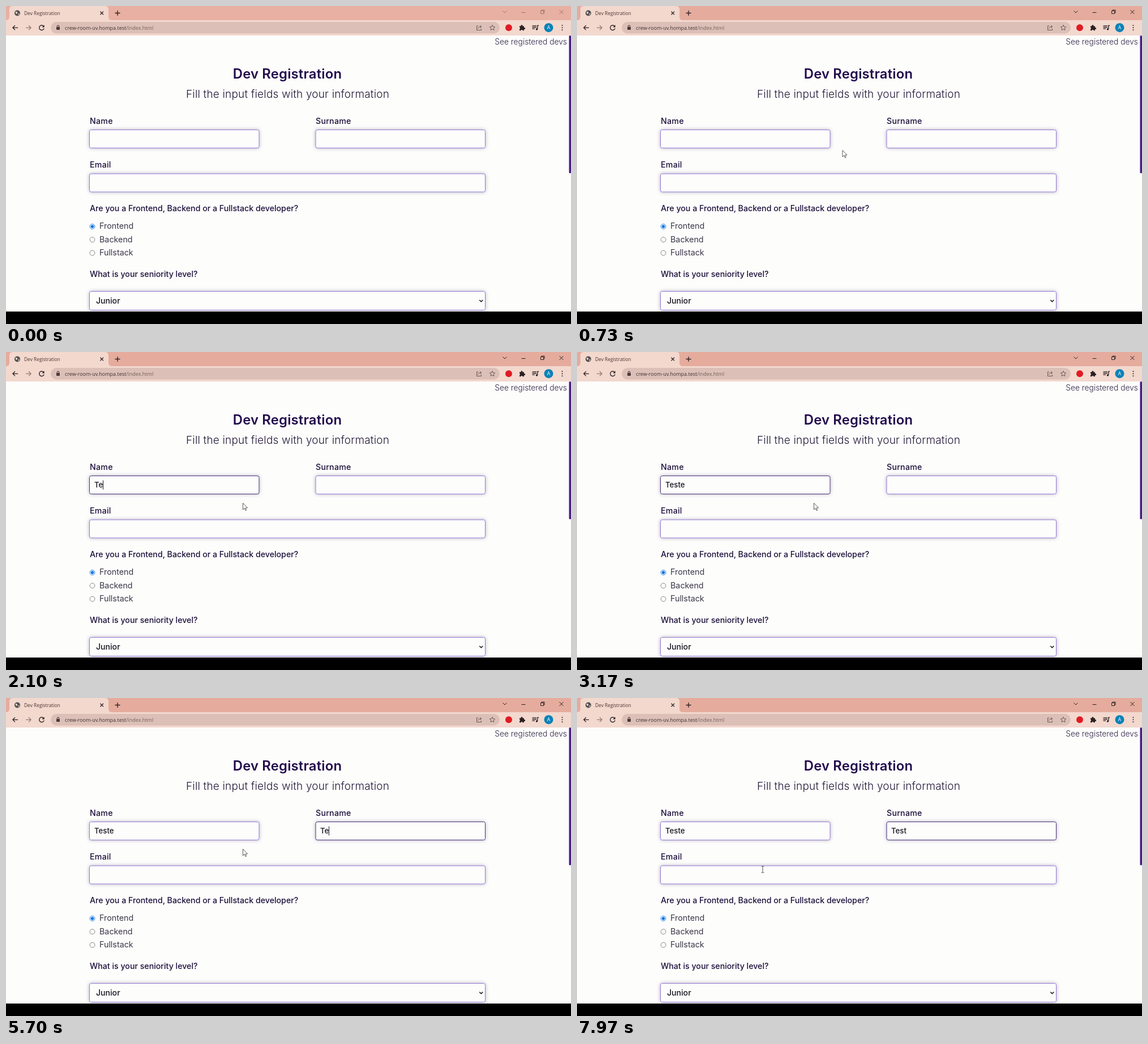
An HTML page for the animation above (8 s loop, 998x561 px).

```html
<!DOCTYPE html>
<html lang="en">
<head>
<meta charset="utf-8">
<title>Dev Registration</title>
<style>
html, body { margin: 0; width: 100%; height: 100%; overflow: hidden; background: #000; }
svg { display: block; width: 998px; height: 561px; }
text { font-family: Inter, "Open Sans", sans-serif; white-space: pre; }
.chrome text { font-family: "Open Sans", "Noto Sans", sans-serif; }
.line { fill: none; stroke: #2b2022; stroke-width: 1.3; }
.thin { stroke-width: 1; }
.label { font-size: 14.2px; font-weight: 450; fill: #1c0f3a; }
.choice { font-size: 14.3px; fill: #3b3547; }
.value { font-size: 13.2px; font-weight: 450; fill: #17121f; }
.box { fill: #fdfdfc; stroke: #967ad8; stroke-width: 1; filter: drop-shadow(0 0 3px rgba(85, 70, 110, .42)); }
.radio { fill: #fff; stroke: #767676; stroke-width: .9; }
.caret { fill: #17121f; }
</style>
</head>
<body>
<svg viewBox="0 0 998 561">
  <rect width="998" height="540" fill="#fdfdfc"/>

  <g class="chrome">
    <rect id="strip" width="998" height="26" fill="#e5ac9d"/>
    <path d="M0 25Q6 25 6 19V6Q6 0 12 0H175Q181 0 181 6V19Q181 25 187 25H998V52H0Z" fill="#f3d8ce"/>
    <circle cx="20" cy="12.5" r="5" fill="#55504f"/>
    <path d="M16.5 11Q19 9 20 11T18 14ZM21 14L24 12.5 22.5 16Z" fill="#f3d8ce"/>
    <text x="32" y="15.5" font-size="8.4" fill="#4a3633">Dev Registration</text>
    <path class="line" d="M166.5 9.7L172 15.2M172 9.7L166.5 15.2M192.5 12.5H201.5M197 8V17"/>

    <g id="win" class="line thin">
      <path d="M877.5 8.5L881 12 884.5 8.5M910.5 11.5H917.5"/>
      <path d="M944.5 8.5H949.5V13.5H944.5ZM946 8.5V7H951V12H949.5"/>
      <path d="M977.5 7L984.5 14M984.5 7L977.5 14"/>
    </g>

    <path class="line" d="M21 38.3H12M16 34.2L11.9 38.3 16 42.4"/>
    <path class="line" d="M35 38.3H44M40 34.2L44.1 38.3 40 42.4" opacity=".5"/>
    <path class="line" d="M66.3 35.5A4.3 4.3 0 1 0 67.2 39.3"/>
    <path d="M67.6 33.3V37.4H63.5Z" fill="#2b2022"/>
    <rect x="79" y="28" width="793" height="20.5" rx="10.2" fill="#dcc0b7"/>
    <rect x="89" y="37" width="6" height="5" rx=".7" fill="#4b393a"/>
    <path class="line thin" d="M90.3 37.5V35.8A1.7 1.7 0 0 1 93.7 35.8V37.5"/>
    <text x="104" y="41.6" font-size="9" fill="#42302f">crew-room-uv.hompa.test<tspan fill="#745d59">/index.html</tspan></text>
    <g class="line thin" stroke-opacity=".65">
      <path d="M834 35H831.5V42.5H839.5V40M833.5 40Q834 36.5 839 36.5M837 34L839.8 36.5 837 39"/>
      <path d="M859 33.6L860.4 36.6 863.7 37 861.3 39.2 861.9 42.4 859 40.8 856.1 42.4 856.7 39.2 854.3 37 857.6 36.6Z"/>
    </g>
    <circle cx="888" cy="38.3" r="6" fill="#e01b24"/>
    <path d="M907 35.5H909.5A1.6 1.6 0 1 1 912.5 35.5H915V38A1.6 1.6 0 1 1 915 41V43.2H912.5A1.5 1.5 0 0 0 909.5 43.2H907V40.7A1.5 1.5 0 0 0 907 37.8Z" fill="#2b2022"/>
    <path class="line" d="M929.5 34.8H937M929.5 37.5H937M929.5 40.2H934M938.8 41V34.5H941"/>
    <circle cx="937.5" cy="41" r="1.7" fill="#2b2022"/>
    <circle cx="958.5" cy="38.2" r="8" fill="#0b82b8"/>
    <text x="958.5" y="41.2" font-size="8.5" fill="#fff" text-anchor="middle">A</text>
    <path d="M982.5 34.3h.01M982.5 38.3h.01M982.5 42.3h.01" stroke="#2b2022" stroke-width="2" stroke-linecap="round"/>
  </g>

  <rect x="994.5" y="52" width="3.5" height="243" rx="1.5" fill="#4b1a86"/>
  <text x="991" y="68" text-anchor="end" font-size="13.8" font-weight="300" fill="#2c2143">See registered devs</text>
  <text x="497" y="128" text-anchor="middle" font-size="23.8" font-weight="600" letter-spacing=".2" fill="#220a4c">Dev Registration</text>
  <text x="497.5" y="161.5" text-anchor="middle" font-size="19" font-weight="300" letter-spacing=".17" fill="#231838">Fill the input fields with your information</text>

  <text class="label" x="148" y="207.5" letter-spacing=".25">Name</text>
  <text class="label" x="547" y="207.5" letter-spacing=".25">Surname</text>
  <text class="label" x="148" y="285" letter-spacing=".25">Email</text>
  <text class="label" x="148" y="362.3">Are you a Frontend, Backend or a Fullstack developer?</text>
  <text class="label" x="148" y="478">What is your seniority level?</text>

  <rect class="box" id="nameBox" x="147.5" y="218.5" width="299.5" height="32" rx="3"/>
  <rect class="box" id="surBox" x="547" y="218.5" width="299.5" height="32" rx="3"/>
  <rect class="box" x="147.5" y="296" width="699" height="32" rx="3"/>
  <rect class="box" x="147.5" y="503.5" width="699" height="33" rx="3"/>

  <text class="value" id="nameText" x="156" y="239"></text>
  <text class="value" id="surText" x="555" y="239"></text>
  <rect class="caret" id="caret" y="226.5" width="1" height="16"/>

  <circle class="radio" cx="152.5" cy="389" r="4.4" style="stroke:#0b70e0"/>
  <circle cx="152.5" cy="389" r="2.7" fill="#0b70e0"/>
  <circle class="radio" cx="152.5" cy="412.2" r="4.4"/>
  <circle class="radio" cx="152.5" cy="435.7" r="4.4"/>
  <text class="choice" x="165" y="393">Frontend</text>
  <text class="choice" x="165" y="416.5">Backend</text>
  <text class="choice" x="165" y="440">Fullstack</text>

  <text class="value" x="159" y="524.7" style="font-size:14.1px">Junior</text>
  <path class="line" d="M836.3 518.6L839.3 521.6 842.3 518.6" style="stroke-width:1.5"/>

  <rect y="539" width="998" height="22"/>

  <g id="cursor">
    <path id="arrow" d="M0 0V11.6L2.7 9.1 4.5 13.2 6.2 12.5 4.4 8.5H8.1Z" fill="#fff" stroke="#333" stroke-width=".8"/>
    <path id="beam" d="M-2.5 -5.5H-.8Q0 -5.5 0 -4.5Q0 -5.5 .8 -5.5H2.5M0 -5V5M-2.5 5.5H-.8Q0 5.5 0 4.5Q0 5.5 .8 5.5H2.5" fill="none" stroke="#444" stroke-width=".9"/>
  </g>
</svg>
<script>
const LOOP = 8000;
const el = id => document.getElementById(id);
const [strip, win, nameBox, surBox, nameText, surText, caret, cursor, arrow, beam] =
  ["strip", "win", "nameBox", "surBox", "nameText", "surText", "caret", "cursor", "arrow", "beam"].map(el);

// time, x, y of the pointer
const path = [
  [60, 300, 528], [400, 385, 380], [730, 469, 254.5], [900, 822, 342],
  [1230, 372, 236.5], [1340, 372, 236.5], [1610, 418.5, 266.5], [5900, 418.5, 266.5],
  [6200, 386, 280], [6560, 425, 244], [6950, 385, 232], [7370, 366, 244],
  [7630, 345, 300], [7790, 345, 300], [7880, 306, 318], [7960, 328, 302.5]
];
const nameKeys = [1810, 2030, 2310, 2540, 2610];
const surKeys = [5330, 5690, 6000, 6270];
// caret toggles, starting hidden
const blinks = [1270, 3100, 3600, 4130, 4270, 4770, 5330, 6770, 7300, 7800];
const fields = [[147, 218, 447, 251], [547, 218, 847, 251], [147, 295, 847, 328]];

const clamp = v => Math.max(0, Math.min(1, v));
const ease = v => v * v * (3 - 2 * v);
const ramp = (t, a, b) => ease(clamp((t - a) / (b - a)));
const passed = (list, t) => list.filter(k => t >= k).length;

function pointer(t) {
  const i = Math.max(0, Math.min(path.length - 2, passed(path.map(p => p[0]), t) - 1));
  const [a, b] = [path[i], path[i + 1]];
  const k = ramp(t, a[0], b[0]);
  return [a[1] + (b[1] - a[1]) * k, a[2] + (b[2] - a[2]) * k];
}

function border(box, k) {
  const mix = (a, b) => Math.round(a + (b - a) * k);
  box.style.stroke = `rgb(${mix(150, 74)},${mix(122, 50)},${mix(216, 122)})`;
}

const show = (node, on) => node.setAttribute("visibility", on ? "visible" : "hidden");

function draw(t) {
  const active = t >= 60;
  strip.setAttribute("fill", active ? "#e5ac9d" : "#e8b0a2");
  win.setAttribute("opacity", active ? 1 : .4);

  const swap = ramp(t, 4270, 4600);
  border(nameBox, ramp(t, 1130, 1310) * (1 - swap));
  border(surBox, swap);

  nameText.textContent = "Teste".slice(0, passed(nameKeys, t));
  surText.textContent = "Test".slice(0, passed(surKeys, t));
  const text = t < 4200 ? nameText : surText;
  const width = text.textContent ? text.getComputedTextLength() : 0;
  caret.setAttribute("x", Math.round(+text.getAttribute("x") + width));
  show(caret, passed(blinks, t) % 2 === 1);

  const [x, y] = pointer(t);
  const inField = fields.some(([l, u, r, d]) => x > l && x < r && y > u && y < d);
  cursor.setAttribute("transform", `translate(${x.toFixed(1)} ${y.toFixed(1)})`);
  show(arrow, active && !inField);
  show(beam, active && inField);
}

const start = performance.now();
function tick() {
  draw((performance.now() - start) % LOOP);
  requestAnimationFrame(tick);
}
tick();
</script>
</body>
</html>
```
